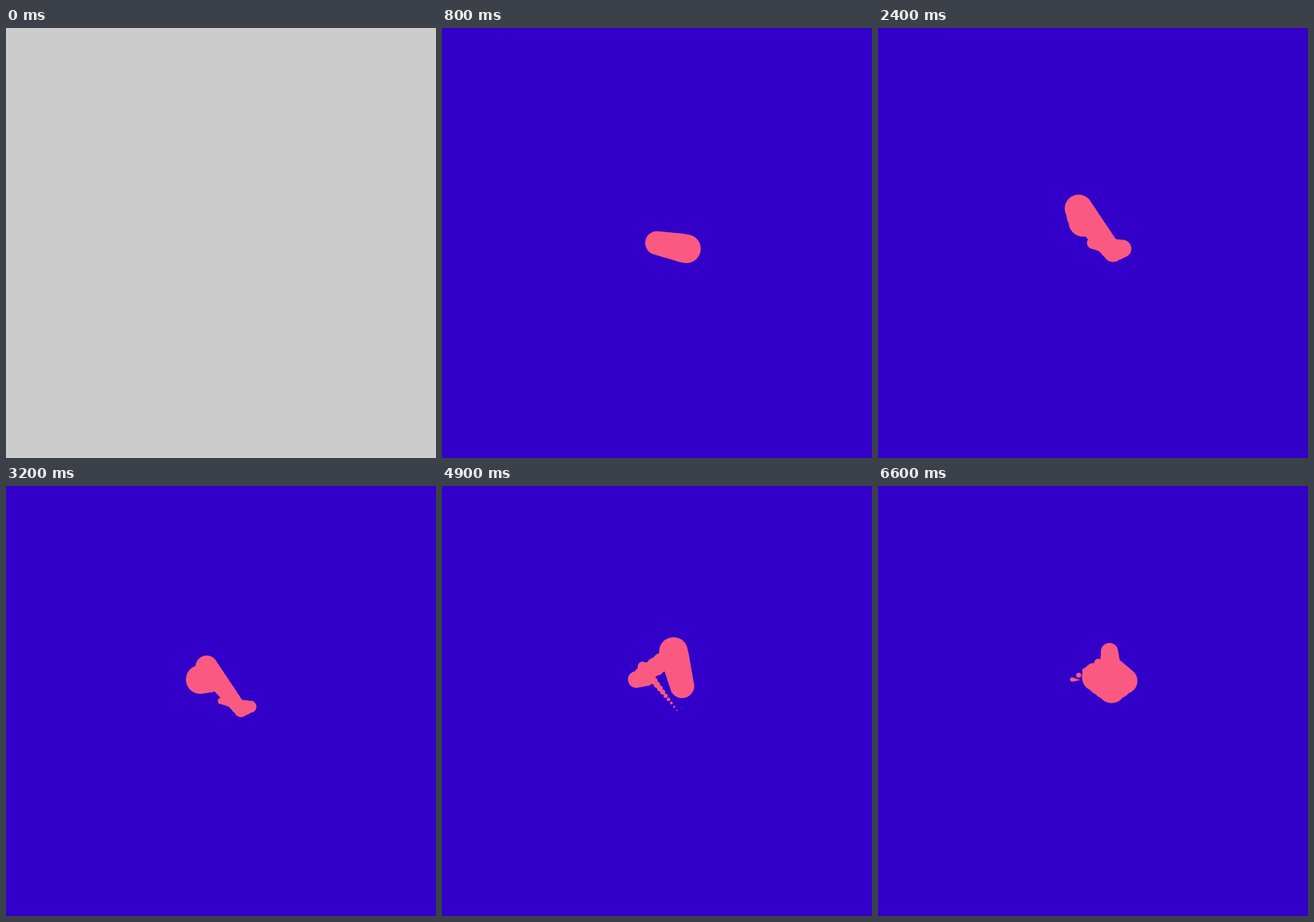
Recreate the animation shown at these times as an HTML page with a canvas. Size 600 px wide and 600 px high, loop 6700 ms.

```html
<!DOCTYPE html>
<html lang="en">
<head>
<meta charset="utf-8">
<title>Shrinking trail</title>
<style>
  html, body { margin: 0; width: 100%; height: 100%; overflow: hidden; background: #ccc; }
  canvas { display: block; }
</style>
</head>
<body>
<canvas id="stage" width="600" height="600"></canvas>
<script>
const ctx = document.getElementById('stage').getContext('2d');
const TICK = 100, TICKS = 67, RADIUS = 20, SHRINK = 0.5;

// The walker goes straight between a few key points: [tick, x, y]
const turns = [
  [0, 300, 300], [8, 341, 308], [10, 328, 313], [22, 280, 252],
  [24, 286, 271], [31, 271, 270], [37, 325, 234], [42, 335, 279],
  [49, 323, 231], [53, 324, 250], [61, 344, 272], [63, 326, 284],
  [66, 304.5, 266.5]
];

const mix = (a, b, k) => a + (b - a) * k;

function walker(tick) {
  const next = Math.max(1, turns.findIndex(p => p[0] >= tick));
  const [t0, x0, y0] = turns[next - 1], [t1, x1, y1] = turns[next];
  const k = (tick - t0) / (t1 - t0);
  return [mix(x0, x1, k), mix(y0, y1, k)];
}

// Full size for the first two ticks, then a steady shrink
const radius = age => Math.min(RADIUS, RADIUS - SHRINK * (age - 1));

function draw(tick) {
  ctx.fillStyle = tick ? '#3200c8' : '#ccc';
  ctx.fillRect(0, 0, 600, 600);
  if (!tick) return;

  ctx.fillStyle = '#fa5a82';
  for (let born = tick; born >= 0; born--) {
    const r = radius(tick - born);
    if (r <= 0) break;
    ctx.beginPath();
    ctx.arc(...walker(born), r, 0, Math.PI * 2);
    ctx.fill();
    // Only the very first head is outlined; the disc before it covers the rest
    if (tick === 1 && born === tick) ctx.stroke();
  }
}

const start = performance.now();
let shown = -1;
function frame() {
  const tick = Math.floor((performance.now() - start) / TICK) % TICKS;
  if (tick !== shown) draw(shown = tick);
  requestAnimationFrame(frame);
}
frame();
</script>
</body>
</html>
```
